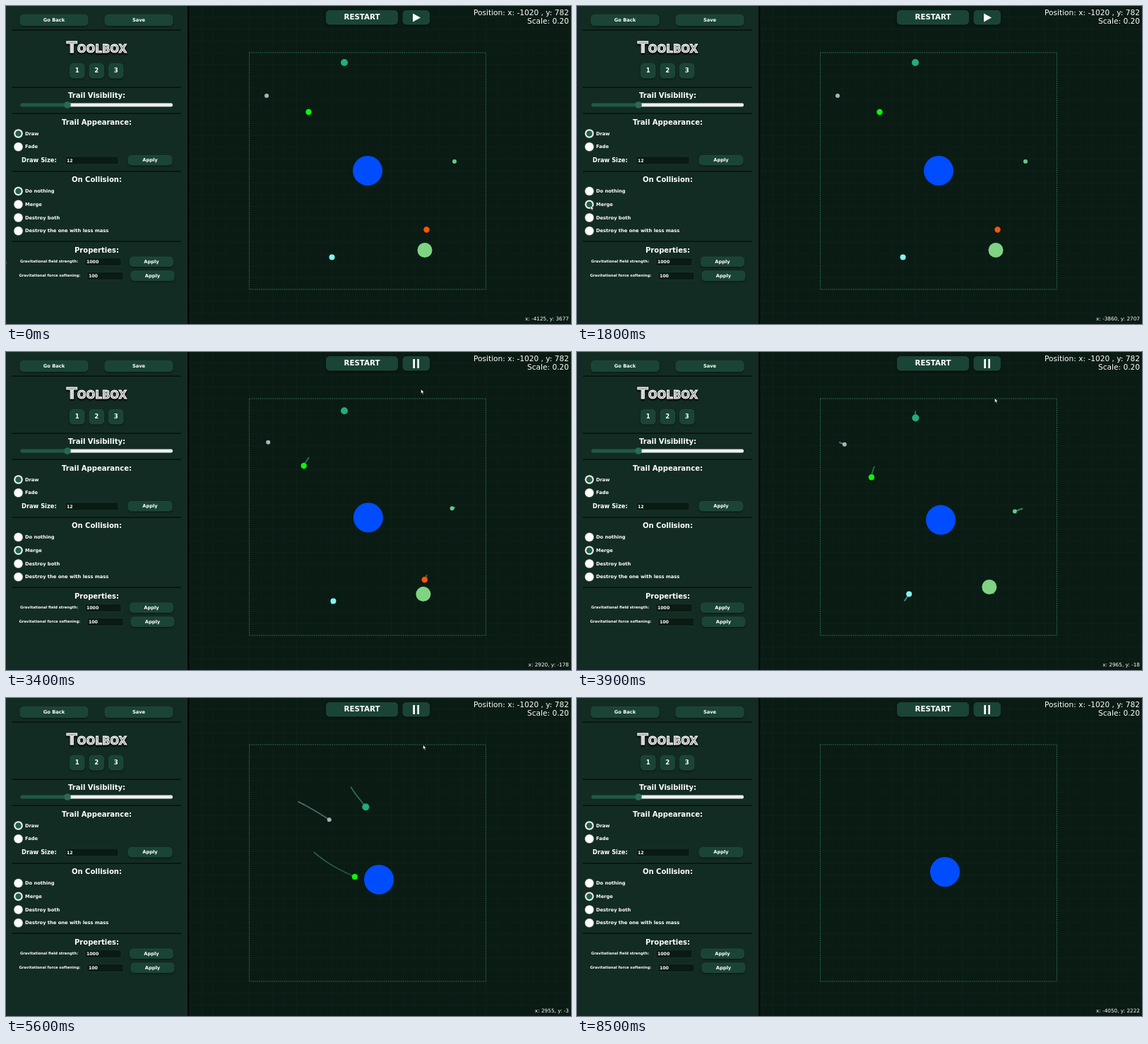
These frames come from a looping animation (800x450 px, 8.8 s). An HTML page with a canvas:

```html
<!DOCTYPE html>
<html lang="en">
<head>
<meta charset="utf-8">
<title>Gravity toolbox</title>
<style>
html, body { margin: 0; width: 100%; height: 100%; overflow: hidden; background: #0a1b14; }
canvas { display: block; }
</style>
</head>
<body>
<canvas id="stage" width="800" height="450"></canvas>
<script>
const ctx = document.getElementById('stage').getContext('2d');
const LOOP = 8800, STEP = 100;
const MERGE_CLICK = 1500, PLAY_CLICK = 2800, RELEASE = 2850, SETTLED = 6300;
const TRAIL_PHASE = 2030, TRAIL_PERIOD = 1430;
const FALL = 2.3;
const FONT = '"DejaVu Sans", sans-serif';

// Each body speeds up along a Bezier path and is absorbed at its end time.
const body = (r, color, trail, end, path, ease = FALL) => ({ r, color, trail, start: RELEASE, end, path, ease });
const bodies = [
  body(5, '#20ae7c', '#2b6b55', 6280, [[479, 80], [478, 153], [524, 132], [530, 222]]),
  body(3, '#a5b5b9', '#53706a', 6240, [[369, 127], [442, 154], [511, 212]]),
  body(4.2, '#0cf50c', '#29694f', 5740, [[428.5, 150], [400.5, 187.5], [421, 225], [511, 260]], 1.4),
  body(3, '#63cb87', '#3d7c5f', 5050, [[635, 220], [552, 250]]),
  body(4.2, '#fc5606', '#6b4a2c', 3650, [[595.5, 316.5], [589, 330]]),
  body(10.5, '#7fd382', '#29694f', 5000, [[593, 345.5], [545, 278]]),
  body(4, '#83f5ef', '#3d7c70', 5150, [[461.5, 355.5], [514, 277]])
];
// The sun is pulled aside, then drifts back to the common centre.
const sunOut = { start: RELEASE, end: 5400, path: [[512, 233], [530, 260]], ease: 2 };
const sunBack = { start: 5400, end: SETTLED, path: [[530, 260], [521, 246]], ease: 1 };

// Pointer glides: start time and world position reached.
const GLIDE = 800;
const glides = [[-GLIDE, -4125, 3677], [100, -3765, 2932], [1000, -3860, 2707], [1900, 2820, -518],
  [2900, 2965, -18], [3900, 2955, -3], [7600, -4050, 2222]];

const clamp01 = v => Math.min(1, Math.max(0, v));
const mix = (a, b, u) => a.map((v, i) => v + (b[i] - v) * u);

function bezier(points, u) {
  if (points.length === 1) return points[0];
  return bezier(points.slice(1).map((p, i) => mix(points[i], p, u)), u);
}

function travel({ start, end, path, ease }, t) {
  return bezier(path, clamp01((t - start) / (end - start)) ** ease);
}

function pointerAt(t) {
  return glides.reduce((from, [start, ...to]) => {
    const u = clamp01((t - start) / GLIDE);
    return mix(from, to, u * u * (3 - 2 * u));
  }, [0, 0]);
}

function circle([x, y], r, color) {
  ctx.fillStyle = color;
  ctx.beginPath();
  ctx.arc(x, y, r, 0, 2 * Math.PI);
  ctx.fill();
}

function rect(x, y, w, h, color, radius = 0) {
  ctx.fillStyle = color;
  ctx.beginPath();
  ctx.roundRect(x, y, w, h, radius);
  ctx.fill();
}

function text(label, x, y, size, align = 'left', style = 'bold') {
  ctx.font = `${style} ${size}px ${FONT}`;
  ctx.textAlign = align;
  ctx.textBaseline = 'middle';
  ctx.fillStyle = '#fff';
  ctx.fillText(label, x, y);
}

function polygon(points, stroke) {
  ctx.beginPath();
  points.forEach(p => ctx.lineTo(...p));
  ctx.closePath();
  ctx.fillStyle = '#fff';
  ctx.fill();
  if (!stroke) return;
  ctx.strokeStyle = stroke;
  ctx.lineWidth = 0.7;
  ctx.stroke();
}

function withShadow(color, blur, offset, draw) {
  ctx.save();
  ctx.shadowColor = color;
  ctx.shadowBlur = blur;
  ctx.shadowOffsetY = offset;
  draw();
  ctx.restore();
}

function button(x, y, w, h, label = '', size = 6.7) {
  withShadow('#0008', 3, 1.5, () => rect(x, y, w, h, '#1a4435', 4.5));
  ctx.strokeStyle = '#265641';
  ctx.lineWidth = 0.6;
  ctx.stroke();
  text(label, x + w / 2, y + h / 2 + 0.5, size, 'center');
}

function input(x, y, w, value) {
  rect(x, y, w, 11, '#0a1b14');
  ctx.strokeStyle = '#1b3c30';
  ctx.lineWidth = 0.7;
  ctx.stroke();
  text(value, x + 2, y + 6, 6.2);
}

function heading(label, y) {
  text(label, 128.5, y, 10, 'center');
}

function radios(top, labels, selected) {
  labels.forEach((label, i) => {
    const y = top + i * 18.75;
    circle([17.5, y], 6.6, '#6f7d77');
    circle([17.5, y], 6, '#fff');
    if (i === selected) circle([17.5, y], 4.3, '#226149');
    text(label, 27, y + 0.5, 6.7);
  });
}

function drawTitle() {
  withShadow('#000', 2, 1.5, () => {
    text('Toolbox', 128.5, 60.5, 22, 'center', 'small-caps bold');
    ctx.strokeStyle = '#fff';
    ctx.lineWidth = 1;
    ctx.strokeText('Toolbox', 128.5, 60.5);
  });
}

function drawPanel(t) {
  rect(0, 0, 257, 450, '#132c23');
  rect(257, 0, 2.5, 450, '#020806');
  for (const y of [34, 115, 152, 234, 333]) rect(8, y - 0.8, 240, 1.8, '#08150f');

  button(20, 12.5, 96, 15, 'Go Back');
  button(140, 12.5, 96, 15, 'Save');
  drawTitle();
  for (let i = 0; i < 3; i++) button(90.5 + 27.5 * i, 81.5, 20.5, 20.5, String(i + 1), 8.5);

  heading('Trail Visibility:', 127.5);
  rect(87, 137.5, 149, 5, '#eef0ee', 2);
  rect(20.5, 137.5, 67, 5, '#1f5a45', 2);
  circle([87, 140], 4.8, '#286a51');

  heading('Trail Appearance:', 165);
  radios(180.5, ['Draw', 'Fade'], 0);
  text('Draw Size:', 22, 218.5, 8.3);
  input(84, 213, 75, '12');
  button(173, 211.5, 62, 13.5, 'Apply');

  heading('On Collision:', 246.5);
  radios(262, ['Do nothing', 'Merge', 'Destroy both', 'Destroy the one with less mass'], t < MERGE_CLICK ? 0 : 1);

  heading('Properties:', 346);
  text('Gravitational field strength:', 20, 362, 5.2);
  input(112, 356.5, 51, '1000');
  button(175.5, 355, 61, 13.5, 'Apply');
  text('Gravitational force softening:', 18.5, 382, 5.2);
  input(115, 376.5, 51, '100');
  button(177, 375, 61, 13.5, 'Apply');
}

function drawSpace(t) {
  rect(257, 0, 543, 450, '#0a1b14');
  const cell = 335 / 20;
  for (let x = 344.5 - 5 * cell; x < 800; x += cell) rect(x - 0.5, 0, 1, 450, '#0c2018');
  for (let y = 66 - 3 * cell; y < 450; y += cell) rect(257, y - 0.5, 543, 1, '#0c2018');
  ctx.strokeStyle = '#2f7658';
  ctx.lineWidth = 1;
  ctx.setLineDash([1.5, 1.5]);
  ctx.strokeRect(344.5, 66, 335, 335);
  ctx.setLineDash([]);

  // Trails are wiped at a steady period and regrow behind each body.
  const sinceWipe = (t - TRAIL_PHASE) % TRAIL_PERIOD;
  const alive = bodies.filter(b => t < b.end);
  for (const b of alive)
    for (let s = Math.max(RELEASE, t - sinceWipe); s < t; s += 17) circle(travel(b, s), 0.9, b.trail);
  if (t >= SETTLED) circle([530.5, 223], 0.8, '#1f4f3c');
  for (const b of alive) circle(travel(b, t), b.r, b.color);
  circle(travel(t < sunBack.start ? sunOut : sunBack, t), 21, '#004dff');
}

function drawHud(t) {
  button(453.5, 6.5, 101, 19.5, 'RESTART', 10.3);
  button(562, 6.5, 37.5, 19.5);
  if (t < PLAY_CLICK) polygon([[576, 10.5], [587, 16.5], [576, 22.5]]);
  else for (const x of [576.3, 582.3]) rect(x, 10, 2.7, 13, '#fff');
  text('Position: x: -1020 , y: 782', 797, 10, 10.6, 'right', '');
  text('Scale: 0.20', 797, 22.5, 10.6, 'right', '');
}

function drawPointer(t) {
  const [wx, wy] = pointerAt(t);
  const x = 591.3 + (wx - 2965) / 11.93, y = 65 + (wy + 18) / 12.55;
  const shownX = Math.round(wx / 5) * 5, shownY = Math.round((wy - 2) / 5) * 5 + 2;
  text(`x: ${shownX}, y: ${shownY}`, 797, 443, 7.3, 'right', '');
  if (t >= 8400) return;
  const overPlay = x > 562 && x < 600 && y < 28;
  const shape = overPlay
    ? [[-4, -8], [-2.5, -8], [-2.2, -4], [1.6, -2], [1, 2.5], [-3.5, 2.5], [-6, -1.5], [-4, -1.5]]
    : [[0, 0], [0, 6.6], [1.5, 5.3], [2.6, 7.8], [3.7, 7.3], [2.7, 4.9], [4.7, 4.8]];
  polygon(shape.map(([dx, dy]) => [x + dx, y + dy]), '#111');
}

function frame(now) {
  const t = Math.floor(now % LOOP / STEP) * STEP;
  drawSpace(t);
  drawPanel(t);
  drawHud(t);
  drawPointer(t);
  requestAnimationFrame(frame);
}
requestAnimationFrame(frame);
</script>
</body>
</html>
```
